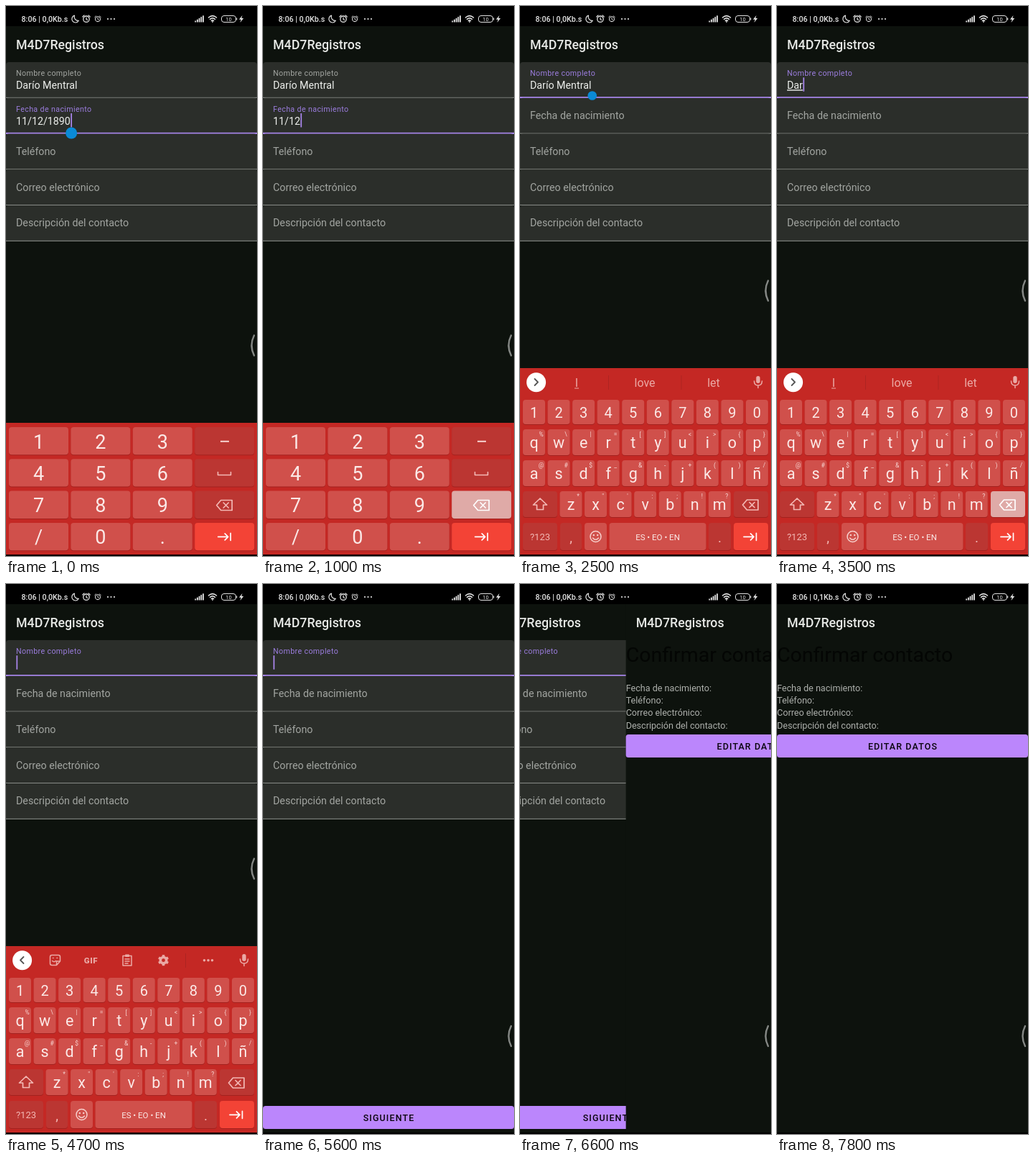
Recreate the animation shown at these times as an HTML page. Size 350 by 764 pixels, loop 8000 ms.

```html
<!DOCTYPE html>
<html lang="es">
<head>
<meta charset="utf-8">
<style>
html, body { margin: 0; width: 100%; height: 100%; overflow: hidden; background: #000; }
svg { display: block; width: 100vw; height: 100vh; }
text { font-family: Roboto, "Noto Sans", sans-serif; white-space: pre; }
.line { fill: none; stroke-linecap: round; stroke-linejoin: round; }
</style>
</head>
<body>
<svg id="stage" viewBox="0 0 350 764"></svg>
<script>
const NS = 'http://www.w3.org/2000/svg';
const stage = document.getElementById('stage');
const LOOP = 8000, TICK = 100;
const BG = '#0d120d', FIELD = '#2b2e2a', LILAC = '#a684e8', BUTTON = '#bb86fc', HINT = '#a2a5a1', RULE = '#8d908c';
const RED = '#c42824', KEY = '#d0504b', DARK_KEY = '#bb3632', HELD_KEY = '#dfaaa7', ENTER = '#f34336';
const INK = '#fbe9e7', SOFT = '#eaa9a5', ICON = '#f3b9b5';
const APP = 'M4D7Registros', NAME = 'Darío Mentral', DATE = '11/12/1890';

function el(tag, attrs, parent, text) {
  const node = document.createElementNS(NS, tag);
  set(node, attrs);
  if (text !== undefined) node.textContent = text;
  parent.appendChild(node);
  return node;
}
function set(node, attrs) {
  for (const k in attrs) node.setAttribute(k, attrs[k]);
}
const group = (parent, x = 0, y = 0) => el('g', { transform: `translate(${x} ${y})` }, parent);
const rect = (p, x, y, width, height, fill, rx = 0) => el('rect', { x, y, width, height, fill, rx }, p);
const label = (p, text, x, y, size, fill, more = {}) =>
  el('text', { x, y, 'font-size': size, fill, ...more }, p, text);
const line = (p, d, stroke, width = 1.3) => el('path', { d, stroke, 'stroke-width': width, class: 'line' }, p);
const circle = (p, cx, cy, r, fill) => el('circle', { cx, cy, r, fill }, p);
const ring = (p, cx, cy, r, stroke, width = 1.2) =>
  el('circle', { cx, cy, r, fill: 'none', stroke, 'stroke-width': width }, p);
const show = (node, on) => set(node, { visibility: on ? 'visible' : 'hidden' });
const move = (node, x, y) => set(node, { transform: `translate(${x} ${y})` });
const clamp = (v, a = 0, b = 1) => Math.min(b, Math.max(a, v));
const MID = { 'text-anchor': 'middle' };

// value of the last step reached in [[time, value], ...]
const stepAt = (steps, t) => steps.reduce((v, [at, next]) => (t >= at ? next : v), steps[0][1]);

// --- pages ---
function page() {
  const g = group(stage);
  rect(g, 0, 28, 350, 734, BG);
  label(g, APP, 14, 60, 17.8, '#e6e8e5', { 'font-weight': 500 });
  return g;
}
function wideButton(p, y, text) {
  const box = rect(p, 0, y, 350, 32, BUTTON, 3.5);
  label(p, text, 175.5, y + 20.6, 12.5, '#0a060f', { ...MID, 'font-weight': 500, 'letter-spacing': 1.1 });
  return box;
}
function field(p, i, title) {
  const g = group(p, 0, 78 + 49.75 * i);
  el('path', { d: 'M0 49.7V4Q0 0 4 0H346Q350 0 350 4V49.7Z', fill: FIELD }, g);
  const rule = rect(g, 0, 48.8, 350, 1, RULE);
  const hint = label(g, title, 14, 0, 14.25, HINT);
  const value = label(g, '', 14, 37.2, 14.25, '#eceeeb');
  const caret = rect(g, 14, 21.3, 1.8, 19.4, LILAC);
  return { rule, hint, value, caret };
}
function drawField(f, text, focused, lift, caretOn, underlined) {
  f.value.textContent = text;
  set(f.value, { 'text-decoration': underlined ? 'underline' : 'none' });
  set(f.rule, focused ? { y: 48, height: 2.2, fill: LILAC } : { y: 48.8, height: 1, fill: RULE });
  set(f.hint, {
    y: 29.4 - 10.1 * lift,
    'font-size': 14.25 - 3.55 * lift,
    'letter-spacing': 0.356 * lift,
    fill: focused ? '#9a7cdc' : HINT
  });
  const end = 14.4 + (text ? f.value.getComputedTextLength() : 0);
  set(f.caret, { x: end });
  show(f.caret, focused && caretOn);
  return end + 0.9;
}

const form = page();
const [nameField, dateField, ...others] =
  ['Nombre completo', 'Fecha de nacimiento', 'Teléfono', 'Correo electrónico', 'Descripción del contacto']
    .map((title, i) => field(form, i, title));
others.forEach(f => drawField(f, '', false, 0, false, false));
const next = wideButton(form, 725, 'SIGUIENTE');
const grip = circle(form, 0, 0, 8, '#0a8ad6');

const confirmPage = page();
label(confirmPage, 'Confirmar contacto', 0, 108, 28.5, '#040604');
['Fecha de nacimiento:', 'Teléfono:', 'Correo electrónico:', 'Descripción del contacto:']
  .forEach((s, i) => label(confirmPage, s, 0, 149 + 17.2 * i, 12.6, '#adb0ac'));
wideButton(confirmPage, 209, 'EDITAR DATOS');

// --- keyboards ---
function key(p, x, y, w, h, text, size, fill = KEY, ink = INK) {
  rect(p, x, y + 1, w, h, '#a3211e', 4);
  const box = rect(p, x, y, w, h, fill, 4);
  if (text) label(p, text, x + w / 2, y + h / 2 + size * 0.36 + 0.7, size, ink, MID);
  return box;
}
function eraseIcon(p, x, y) {
  const g = group(p, x, y);
  return line(g, 'M-5 -7H10.5V7H-5L-11 0ZM-1.5 -3.5L5.5 3.5M5.5 -3.5L-1.5 3.5', ICON, 1.7);
}
function enterIcon(p, x, y) {
  line(group(p, x, y), 'M-9 0H5M0.5 -4.5L5 0L0.5 4.5M8.5 -5V5', '#fff', 1.7);
}
function pressErase({ box, icon }, on) {
  set(box, { fill: on ? HELD_KEY : DARK_KEY });
  set(icon, { stroke: on ? '#fff' : ICON });
}

const numPad = group(stage);
rect(numPad, 0, 579, 350, 183, RED);
const padKeys = ['123-', '456 ', '789<', '/0.>'].map((row, r) => [...row].map((c, i) => {
  const x = 4 + 86.4 * i, y = 585 + 44.3 * r, side = i === 3;
  const fill = c === '>' ? ENTER : side ? DARK_KEY : KEY;
  return key(numPad, x, y, 83, 38.3, side ? '' : c, 27, fill);
}));
rect(numPad, 299, 603.8, 12, 2, '#f7d3d0');
line(numPad, 'M295.5 647.5v4h18v-4', ICON, 1.6);
const padErase = { box: padKeys[2][3], icon: eraseIcon(numPad, 304.7, 693.5) };
enterIcon(numPad, 304.7, 737.3);

const board = group(stage);
rect(board, 0, 503, 350, 259, RED);
const PITCH = 34.55;
function keyRow(chars, hints, x0, y, h, size) {
  [...chars].forEach((c, i) => {
    const x = x0 + PITCH * i;
    key(board, x, y, 31, h, c, size);
    if (hints) label(board, hints[i], x + 25.5, y + 9.5, 8.5, '#f7d3d0', MID);
  });
}
keyRow('1234567890', '', 4, 547, 34, 20);
keyRow('qwertyuiop', '%\\|=[]<>{}', 4, 588, 36, 21.5);
keyRow('asdfghjklñ', '@#$_&-+()/', 4, 631, 36, 21.5);
keyRow('zxcvbnm', '*"\':;!?', 55.5, 674, 36, 21.5);
key(board, 4, 674, 48, 36, '', 0, DARK_KEY);
line(board, 'M28 684L37.5 693H32.5V699.5H23.5V693H18.5Z', ICON, 1.7);
const boardErase = { box: key(board, 298, 674, 48, 36, '', 0, DARK_KEY), icon: eraseIcon(board, 321.5, 693) };
key(board, 4, 718, 48, 38, '?123', 13, DARK_KEY, ICON);
key(board, 56, 718, 30, 38, ',', 19, DARK_KEY, ICON);
key(board, 90, 718, 31, 38, '', 0);
ring(board, 105.5, 737, 7.5, '#f7cfcc', 1.5);
circle(board, 102.8, 735, 1.2, '#f7cfcc');
circle(board, 108.2, 735, 1.2, '#f7cfcc');
line(board, 'M101.5 739Q105.5 743.5 109.5 739', '#f7cfcc', 1.5);
key(board, 124.5, 718, 135, 38, 'ES • EO • EN', 11.5);
key(board, 263, 718, 31, 38, '.', 19, DARK_KEY, ICON);
key(board, 298, 718, 48, 38, '', 0, ENTER);
enterIcon(board, 321, 737.3);

circle(board, 22.6, 522.7, 13.5, '#fff');
const chevron = line(board, '', '#555', 1.8);
rect(board, 329.3, 514, 5.4, 10, SOFT, 2.7);
line(board, 'M326.5 521Q326.5 527 332 527T337.5 521M332 527.5V530.5', SOFT, 1.5);

const words = group(board);
[['I', 79], ['love', 174], ['let', 270]].forEach(([s, x]) => label(words, s, x, 528.7, 16, '#eba9a5', MID));
rect(words, 76, 530.5, 6, 1, '#eba9a5');
rect(words, 123, 513, 1, 20, '#ad2421');
rect(words, 224.5, 513, 1, 20, '#ad2421');

const tools = group(board);
line(tools, 'M64 515.5H73Q75.5 515.5 75.5 518V524L70.5 529.5H64Q61.5 529.5 61.5 527V518Q61.5 515.5 64 515.5M75.5 524H70.5V529.5M64.5 523.5Q67 526 69.5 523.5M65.5 519.5H66M71 519.5H71.5', SOFT, 1.5);
label(tools, 'GIF', 118.5, 526.5, 11.5, SOFT, { ...MID, 'font-weight': 900, 'letter-spacing': 0.7 });
line(tools, 'M163 516.5H175V530H163ZM166 521H172M166 524H172M166 527H170', SOFT, 1.5);
rect(tools, 166, 514.5, 6, 3.5, SOFT, 1);
ring(tools, 219.5, 522.7, 4.2, SOFT, 3.6);
for (let i = 0; i < 6; i++) {
  el('rect', { x: 217.7, y: 515.2, width: 3.6, height: 3, fill: SOFT, transform: `rotate(${60 * i} 219.5 522.7)` }, tools);
}
rect(tools, 250, 513, 1, 20, '#ad2421');
[276.5, 282, 287.5].forEach(x => circle(tools, x, 522.7, 1.8, SOFT));

// --- system chrome ---
rect(stage, 0, 0, 350, 28, '#000');
rect(stage, 0, 762, 350, 2, '#000');
const bar = group(stage), WHITE = '#e4e4e4';
const clock = label(bar, '', 21.5, 22.2, 10.7, WHITE, { 'font-weight': 500 });
line(bar, 'M95.5 13.2A5 5 0 1 0 101.3 20.3A5.3 5.3 0 0 1 95.5 13.2Z', WHITE, 1.2);
[[112, 1], [128, 0.82]].forEach(([x, scale]) => {
  const g = el('g', { transform: `translate(${x} 18.2) scale(${scale})` }, bar);
  ring(g, 0, 0, 4.2, WHITE, 1.3);
  line(g, 'M-5.2 -3.2L-3 -5.2M5.2 -3.2L3 -5.2M0 -2V0.3L1.6 1.3', WHITE, 1.2);
});
[142, 146.5, 151].forEach(x => circle(bar, x, 18, 1.1, WHITE));
for (let i = 0; i < 5; i++) rect(bar, 263.3 + 2.7 * i, 20.5 - 1.8 * i, 1.8, 2 + 1.8 * i, WHITE);
line(bar, 'M282.5 16Q288 11.3 293.5 16M284.5 18.3Q288 15.3 291.5 18.3M286.4 20.5Q288 19.2 289.6 20.5', WHITE, 1.6);
circle(bar, 288, 22, 0.9, WHITE);
el('rect', { x: 300.5, y: 13.5, width: 20, height: 9, rx: 3.5, fill: 'none', stroke: WHITE }, bar);
rect(bar, 321.3, 16.5, 1, 3, WHITE);
label(bar, '10', 310.5, 20.8, 7.5, WHITE, MID);
el('path', { d: 'M329.5 13L325 18.8H327.8L326.5 23L331.3 17H328.4Z', fill: WHITE }, bar);
const edge = group(stage);
line(edge, 'M346 -14Q339 0 346 14', '#858885', 2.4);

// --- timeline ---
const caretSteps = [[0, true], [1700, false], [1900, true], [2400, false], [2800, true],
  [4100, false], [4600, true], [5200, false], [5600, true], [6100, false]];
const edgeSteps = [[0, 471.5], [2200, 395.5], [4900, 628]];
const dropSteps = [[0, 0], [4800, 70], [4900, 190], [5000, 262]];
const pressSteps = [[0, BUTTON], [6200, '#a97ae4'], [6300, '#986ecd'], [6500, BUTTON]];

// a held erase key: one letter at once, then a steady run
function held(text, t, press, run, every) {
  const gone = t < press ? 0 : 1 + Math.max(0, Math.floor((t - run) / every));
  return text.slice(0, Math.max(0, text.length - gone));
}

function draw(t) {
  const onName = t >= 1900;
  const caretOn = stepAt(caretSteps, t);
  const name = held(NAME, t, 2800, 3140, 40);
  const date = held(DATE, t, 400, 800, 50);
  const lift = 1 - clamp((t - 1870) / 167);
  const nameEnd = drawField(nameField, name, onName, 1, caretOn, t >= 2800);
  const dateEnd = drawField(dateField, date, !onName, lift, caretOn, false);

  show(grip, t < 400 || (t >= 2000 && t < 2800));
  set(grip, onName ? { cx: nameEnd, cy: 124.5, r: 6.3 } : { cx: dateEnd, cy: 176.5, r: 8 });

  show(numPad, t < 2200);
  show(board, t >= 2200 && t < 5000);
  move(board, 0, stepAt(dropSteps, t));
  pressErase(padErase, t >= 400 && t < 1400);
  pressErase(boardErase, t >= 2800 && t < 3900);
  const toolsIn = clamp((t - 3900) / 200);
  set(words, { opacity: toolsIn ? 0 : 1 });
  set(tools, { opacity: toolsIn });
  set(chevron, { d: toolsIn ? 'M24.5 518L20 522.5L24.5 527' : 'M20.5 518L25 522.5L20.5 527' });

  set(next, { fill: stepAt(pressSteps, t) });
  const slide = 1 - Math.pow(1 - clamp((t - 6500) / 400), 3);
  move(form, -90 * slide, 0);
  move(confirmPage, 350 * (1 - slide), 0);
  show(confirmPage, slide > 0);

  move(edge, 0, stepAt(edgeSteps, t));
  clock.textContent = `8:06 | 0,${t < 7500 ? 0 : 1}Kb.s`;
}

const start = performance.now();
function tick() {
  const t = (performance.now() - start) % LOOP;
  draw(Math.floor(t / TICK) * TICK);
  requestAnimationFrame(tick);
}
tick();
</script>
</body>
</html>
```
